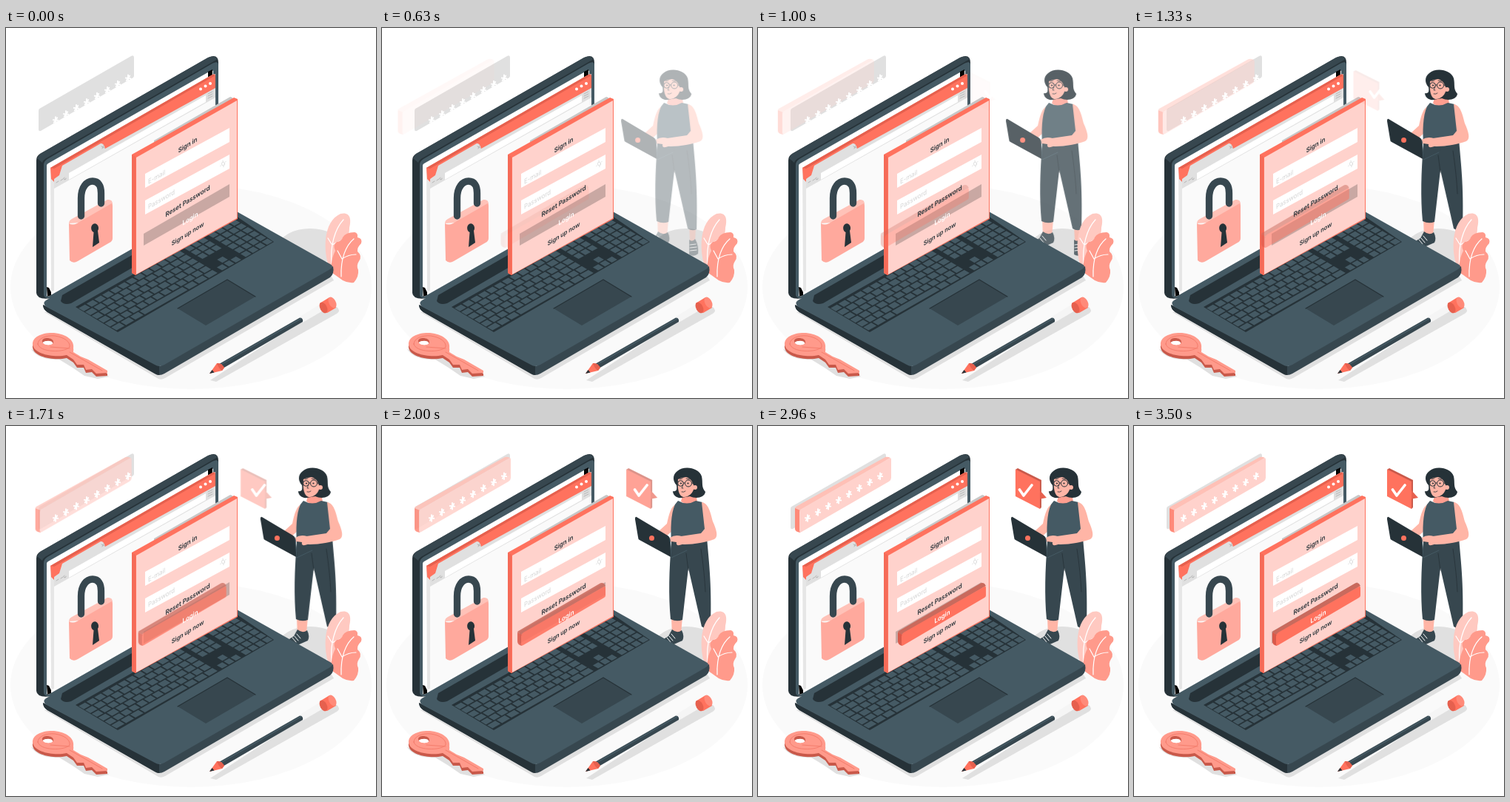
An HTML page that plays this animation: 500 by 500 pixels, repeating every 3540 ms.

```html
<!DOCTYPE html>
<html lang="en">
<head>
<meta charset="utf-8">
<title>Sign in</title>
<style>
  html, body { margin: 0; width: 100%; height: 100%; overflow: hidden; background: #fff; }
  svg { display: block; width: 100vw; height: 100vh; }
  text { font-family: Inter, "Open Sans", sans-serif; font-size: 9px; }
  .label { font-weight: 600; fill: #263238; text-anchor: middle; }
  .hint { fill: #d4d4d4; }
  .line { fill: none; stroke-linecap: round; stroke-linejoin: round; }
</style>
</head>
<body>
<svg viewBox="0 0 500 500">
  <defs>
    <path id="keyShape" fill-rule="evenodd" d="M36 428 C35 417 50 411 65 412 C82 414 93 422 91 433 L91 438 L101 444 L111 448 L137 463 V466 L122 467 L116 461 L108 462 L105 455 L96 455 L91 448 L82 442 C66 446 38 441 36 428Z M49 423 C49 429 62 430 64 425 C65 418 49 417 49 423Z"/>
  </defs>

  <!-- floor and shadows -->
  <ellipse cx="250" cy="350" rx="244" ry="138" fill="#fafafa"/>
  <ellipse cx="411" cy="295" rx="42" ry="24" fill="#e0e0e0"/>
  <path d="M52 384 L206 474 Q210 476 215 473 L443 341 L430 320Z" fill="#e0e0e0"/>
  <path d="M276 476 L284 478 L447 386 Q453 382 447 377 L430 376Z" fill="#e0e0e0"/>
  <path d="M34 434 Q44 449 72 448 L90 459 L106 470 L124 474 L139 471 L120 455Z" fill="#e0e0e0"/>

  <!-- woman -->
  <g id="woman">
    <path d="M391 258 L406 258 L404 281 L392 283Z M434 268 L443 268 L442 288 L435 289Z" fill="#ffb5a6"/>
    <path d="M392 275 Q399 281 405 276 Q409 284 406 290 L390 297 L374 298 Q376 290 387 284Z" fill="#37474f"/>
    <path d="M434 286 Q438 290 442 285 Q447 294 446 305 Q440 310 434 306Z" fill="#37474f"/>
    <path d="M385 286 l5 6 M388 284 l5 6 M391 281 l5 6 M435 293 l8 -1 M435 297 l9 -1 M435 301 l9 -1" class="line" stroke="#fff" stroke-width="1"/>
    <path d="M391 157 L439 150 C441 178 446 210 444 272 Q438 275 432 271 L414 192 L406 262 Q398 265 390 261 C387 228 388 196 391 157Z" fill="#37474f"/>
    <path d="M411 172 L414 195 M431 166 Q436 200 437 224" class="line" stroke="#263238" stroke-width=".8"/>
    <path d="M398 105 C390 109 388 119 385 132 L373 143 L382 151 L393 141Z" fill="#ffb5a6"/>
    <path d="M407 90 L424 88 L426 103 Q415 110 404 102Z" fill="#ff9e8f"/>
    <path d="M400 101 Q412 108 424 101 L433 103 C438 113 439 136 439 155 Q414 164 391 158 C390 140 390 119 396 106Z" fill="#455a64"/>
    <path d="M432 103 C441 104 444 117 447 129 C452 140 455 150 449 153 C438 157 422 160 409 160 L402 161 Q393 161 389 155 L390 151 L404 149 L431 145 L436 139Z" fill="#ffb5a6"/>
    <path d="M391 178 L412 168 L414 163 L391 153Z" fill="#37474f"/>
    <path d="M344 123 L386 148 Q388 149 389 152 L392 178 L348 154 Q346 153 346 150 L342 126 Q342 122 344 123Z" fill="#263238"/>
    <path d="M389 151 L391 178 L412 168" class="line" stroke="#455a64" stroke-width="1"/>
    <circle cx="364.500" cy="151.500" r="3.500" fill="#ff725e"/>
    <path d="M389 151 Q396 146 405 149 L413 158 L402 161 Q397 162 398 157 L391 156Z" fill="#ffb5a6"/>
    <path d="M399 61 C408 53 428 56 432 68 C434 77 431 82 437 89 C436 97 424 99 416 95 L405 97 C398 98 393 93 393 88 C398 89 399 86 398 80 C392 74 393 65 399 61Z" fill="#263238"/>
    <path d="M400 72 C402 65 414 64 420 71 L422 82 C421 91 413 97 407 96 C401 94 399 86 400 72Z" fill="#ffb5a6"/>
    <path d="M397 74 C396 60 417 56 426 68 L427 86 L421 80 C419 74 417 71 411 69 C406 70 402 70 397 74Z" fill="#263238"/>
    <circle cx="423" cy="83" r="3" fill="#ffb5a6"/>
    <path d="M402 72 l4 -1 M411 71 l5 1 M405 89 q3 1 5 -1 M407 79 l-2 5 2 0" class="line" stroke="#263238" stroke-width=".8"/>
    <g fill="none" stroke="#263238">
      <circle cx="403.500" cy="77.500" r="3.800"/><circle cx="414" cy="77.500" r="4.500"/>
      <path d="M407 77 h2.500 M418.500 77 l5 1"/>
    </g>
    <circle cx="404" cy="77.500" r="1.100" fill="#263238"/><circle cx="413.500" cy="77.500" r="1.100" fill="#263238"/>
  </g>

  <!-- leaves -->
  <path d="M436 322 C429 301 428 262 452 251 C465 248 467 258 464 270 C464 286 455 294 452 318Z" fill="#ffc9c1"/>
  <path d="M440 318 C438 295 444 272 456 259 M440 292 l-5 -8 M441 293 q8 -5 14 -6" class="line" stroke="#fff" stroke-width="1.200"/>
  <path d="M441 331 C438 320 441 309 445 301 Q441 293 447 289 Q454 288 455 283 Q459 276 471 276 Q476 277 475 283 Q482 284 480 291 Q474 297 475 302 Q482 308 477 315 Q473 321 476 327 Q477 336 470 344 Q462 345 455 341Z" fill="#ff9a8b"/>
  <path d="M453 336 C452 312 459 294 470 285 M454 312 L448 301 M454 312 q9 -6 19 -6" class="line" stroke="#fff" stroke-width="1.200"/>

  <!-- laptop lid -->
  <path d="M41 179 Q41 173 46 170 L273 40 Q287 34 287 47 L287 240 L62 365 Q42 368 41 358Z" fill="#263238"/>
  <path d="M51 185 Q51 180 56 177 L277 49 Q287 43 287 50 L287 240 L60 365 Q51 366 51 360Z" fill="#455a64"/>
  <path d="M46 170 L273 40 Q282 36 286 42 L56 175 Q50 178 49 182 L42 176Z" fill="#37474f"/>
  <path d="M55 186 Q55 184 57 183 L278 57 L280 58 V236 L57 363 L55 362Z" fill="#fff"/>
  <path d="M273 59 L279 56 V65 L273 68Z M55 350 L58 351 L61 357 V361 L56 363Z" fill="#000"/>

  <!-- browser -->
  <path d="M60 189 L274 66 L283 62 V230 L66 355 L61 356Z" fill="#e6e6e6"/>
  <path d="M65 204 L283 78 V231 L65 356Z" fill="#fafafa"/>
  <path d="M60 189 L279 63 Q283 61 283 65 V82 L65 208 L61 204Z" fill="#ff725e"/>
  <path d="M60 189 L279 63 L283 64 L65 190Z" fill="#e6604e"/>
  <path d="M65 204 L72 199 L76 186 L128 156 Q132 155 134 163 L283 81 V94 L65 217Z" fill="#e0e0e0"/>
  <path d="M85 196 L270 91 V100 L85 205Z" fill="#fff"/>
  <path d="M129 160 l4 2 m-3 1 l2 -4 M68 209 l3 -2 M74 206 l3 -2 M79 202 a1.500 1.500 0 1 0 2 1 M273 89 l6 -3 m-6 6 l6 -3 m-6 6 l6 -3" class="line" stroke="#b5b5b5" stroke-width="1"/>
  <g fill="#fff"><circle cx="263" cy="82.500" r="2"/><circle cx="269.500" cy="78.500" r="2"/><circle cx="276" cy="75" r="2"/></g>

  <!-- padlock -->
  <path d="M85 264 Q85 260 89 258 L137 232 Q144 231 144 238 L100 263Z" fill="#ffc2b8"/>
  <path d="M101.500 254 V230 C101.500 215 109 207 117 207 C125 207 128.500 213 128.500 223 V237" class="line" stroke="#37474f" stroke-width="9.300"/>
  <path d="M85 264 Q90 267 96 264 L141 238 Q144 236 144 240 V284 Q144 288 140 290 L97 315 Q91 319 86 314Z" fill="#ffa99d"/>
  <path d="M118.500 276 A5 6 0 1 1 124 274 L126 290 L117 296Z" fill="#263238"/>

  <!-- laptop base -->
  <path d="M50 374 L208 457 L442 322 Q444 332 438 337 L214 467 Q207 471 201 467 L56 384 Q50 380 50 374Z" fill="#37474f"/>
  <path d="M50 374 L207 457 V469 Q204 469 201 467 L56 384 Q50 380 50 374Z" fill="#263238"/>
  <path d="M54 368 L280 238 Q287 234 294 238 L438 319 Q444 322 438 326 L214 455 Q207 459 201 455 L55 377 Q48 372 54 368Z" fill="#455a64"/>
  <path d="M76 361 L285 241 L296 251 L88 372 Q78 375 74 369Z" fill="#263238"/>
  <path d="M94 377 L311 254 L362 289 L151 411Z" fill="#263238"/>
  <path id="keys" fill="#455a64"/>
  <path d="M232 379 L299 340 L337 363 L270 402Z" fill="#37474f"/>
  <path d="M232 379 L299 340 L337 363" class="line" stroke="#263238" stroke-width="1.300"/>

  <!-- sign-in panel -->
  <path d="M200 152 L303 93 L306 94 V100 L200 160Z" fill="#c7c7c7"/>
  <path d="M170 171 L308 94 L313 96 V258 L175 334 L170 331Z" fill="#ff725e"/>
  <path d="M176 175 L312 98 V257 L176 333Z" fill="#ffd2cc"/>
  <path d="M170 171 L175 174 V334 L170 331Z" fill="#f56b58"/>
  <path d="M188 197 L302 135 V154 L188 216Z M188 233 L302 171 V190 L188 252Z" fill="#fff"/>
  <g class="line" stroke="#d4d4d4" stroke-width=".8"><ellipse cx="293.500" cy="183.500" rx="2" ry="2.500"/><path d="M290.500 186 l-.7 .5 M296.500 181 l.7 -.5 M293 180 v-.7 M294 187 v.7"/></g>
  <path d="M186 278 L302 211 V228 L186 294Z" fill="#c9a8a3"/>
  <text class="hint" transform="matrix(.866 -.5 0 1 192 211)">E-mail</text>
  <text class="hint" transform="matrix(.866 -.5 0 1 192 245)">Password</text>
  <text class="label" transform="matrix(.866 -.54 0 1 245.500 161)">Sign in</text>

  <g class="slide">
    <path d="M187 279 Q187 277 190 276 L298 213 Q301 211 304 213 L306 216 L192 282Z" fill="#c96a5d"/>
    <path d="M187 279 L193 282 V297 Q187 296 187 291Z" fill="#d9594a"/>
    <path d="M192 284 Q192 281 195 279 L304 217 Q306 216 306 219 V229 Q306 231 304 232 L195 296 Q192 298 192 295Z" fill="#ff725e"/>
  </g>
  <text class="label" transform="matrix(.866 -.54 0 1 245.500 237)">Reset Password</text>
  <text class="label" style="fill:#fff" transform="matrix(.866 -.54 0 1 249 260.500)">Login</text>
  <text class="label" style="font-size:8.500px" transform="matrix(.866 -.54 0 1 245.500 281)">Sign up now</text>

  <!-- password bar -->
  <path d="M44 112 Q44 109 47 108 L169 38 Q173 36 173 40 V64 Q173 67 170 68 L47 139 Q44 140 44 137Z" fill="#e0e0e0"/>
  <g class="slide">
    <path d="M48 111 Q48 109 51 108 L170 42 Q173 41 177 43 L54 114Z" fill="#ffc0b6"/>
    <path d="M48 111 L55 114 V144 Q48 143 48 139Z" fill="#ff8a79"/>
    <path d="M54 116 Q54 113 57 112 L175 44 Q178 42 178 45 V70 Q178 73 175 75 L57 143 Q54 145 54 141Z" fill="#ffd2cc"/>
  </g>
  <path id="stars" class="line" stroke="#fff" stroke-width="1.900"/>

  <!-- speech bubble: the plate travels further than its tick -->
  <g class="slide"><g class="slide">
    <g class="slide">
      <path d="M342 59 L345 57 L377 73 V110 L375 112Z" fill="#c9594a"/>
      <path d="M375 87 L384 97 L373 99Z" fill="#e6604e"/>
      <path d="M342 58.500 L375 75 V112 L342 95Z" fill="#ff725e"/>
    </g>
    <path d="M349.500 86 L355 94 L366 80" class="line" stroke="#fff" stroke-width="3.600"/>
  </g></g>

  <!-- key -->
  <use href="#keyShape" y="4" fill="#c9594a"/>
  <use href="#keyShape" fill="#ff9a8b"/>
  <path d="M43 427 C43 419 55 415 66 416 C79 418 87 424 86 431 C80 439 45 439 43 427Z M60 431 L86 433 M86 438 L130 463" class="line" stroke="#f27a69" stroke-width=".9"/>
  <ellipse cx="57" cy="425.500" rx="6" ry="2.800" fill="#fff"/>

  <!-- pencil -->
  <path d="M397 390 L425 373 L430 381 L401 398Z" fill="#f5f5f5"/>
  <path d="M288 454 L397 391.500 Q402 392 401 397 L293 460Z" fill="#37474f"/>
  <path d="M290 455 L399 392.500" class="line" stroke="#455a64" stroke-width="1.500"/>
  <path d="M275 467 L285 453 Q291 452 295 459 L292 463Z" fill="#ff725e"/>
  <path d="M285 453 Q291 452 295 459 L292 463 Q287 460 285 453Z" fill="#e6604e"/>
  <path d="M275 467 L278.500 462 L281.500 465.500Z" fill="#263238"/>
  <path d="M424 372 L437 364 L446 378 L434 385 Q424 384 424 372Z" fill="#ff725e"/>
  <ellipse cx="429" cy="378" rx="4.600" ry="7.800" transform="rotate(-28 429 378)" fill="#e6604e"/>
  <ellipse cx="441" cy="371" rx="4.600" ry="8" transform="rotate(-28 441 371)" fill="#ff8a79"/>
</svg>
<script>
(() => {
  const LOOP = 3540;
  const $ = id => document.getElementById(id);

  // Keyboard: u runs along a row, v runs towards the viewer
  const at = (u, v) => `${(97 + 213 * u + 53 * v).toFixed(1)} ${(378 - 121 * u + 31 * v).toFixed(1)}`;
  const keyCap = (u, v, w, h) =>
    `M${at(u, v)}L${at(u + w, v)}L${at(u + w, v + h)}L${at(u, v + h)}Z`;
  let caps = '';
  const addRow = (start, end, count, row) => {
    const step = (end - start) / count;
    for (let i = 0; i < count; i++) {
      caps += keyCap(start + i * step, row / 6 + .02, step - .009, .135);
    }
  };
  for (let row = 0; row < 6; row++) {
    if (row < 5) addRow(0, .65, 13 - row % 2, row);
    if (row < 3) addRow(.67, .8, 3, row);
    addRow(.82, 1, 4, row);
  }
  addRow(0, .18, 3, 5);
  addRow(.18, .46, 1, 5);
  addRow(.46, .65, 3, 5);
  addRow(.713, .757, 1, 4);
  addRow(.67, .8, 3, 5);
  $('keys').setAttribute('d', caps);

  // Password asterisks
  let stars = '';
  for (let i = 0; i < 8; i++) {
    const x = 67 + 14 * i, y = 124.5 - 8.1 * i;
    stars += `M${x} ${y - 4.3}v8.600M${x - 3.2} ${y - .3}l6.400 .6M${x - 2.2} ${y + 3.2}l4.400 -6.400`;
  }
  $('stars').setAttribute('d', stars);

  // Slide in from the left with a slight overshoot, then rest until the loop ends
  function slideIn(el, duration) {
    const shown = { transform: 'translateX(0px)', opacity: 1 };
    el.animate([
      { transform: 'translateX(-30px)', opacity: 0, easing: 'cubic-bezier(.36,-.01,.5,1.38)' },
      { ...shown, offset: duration / LOOP },
      shown
    ], { duration: LOOP, iterations: Infinity });
  }
  slideIn($('woman'), 1950);
  document.querySelectorAll('.slide').forEach(el => slideIn(el, 3500));
})();
</script>
</body>
</html>
```
